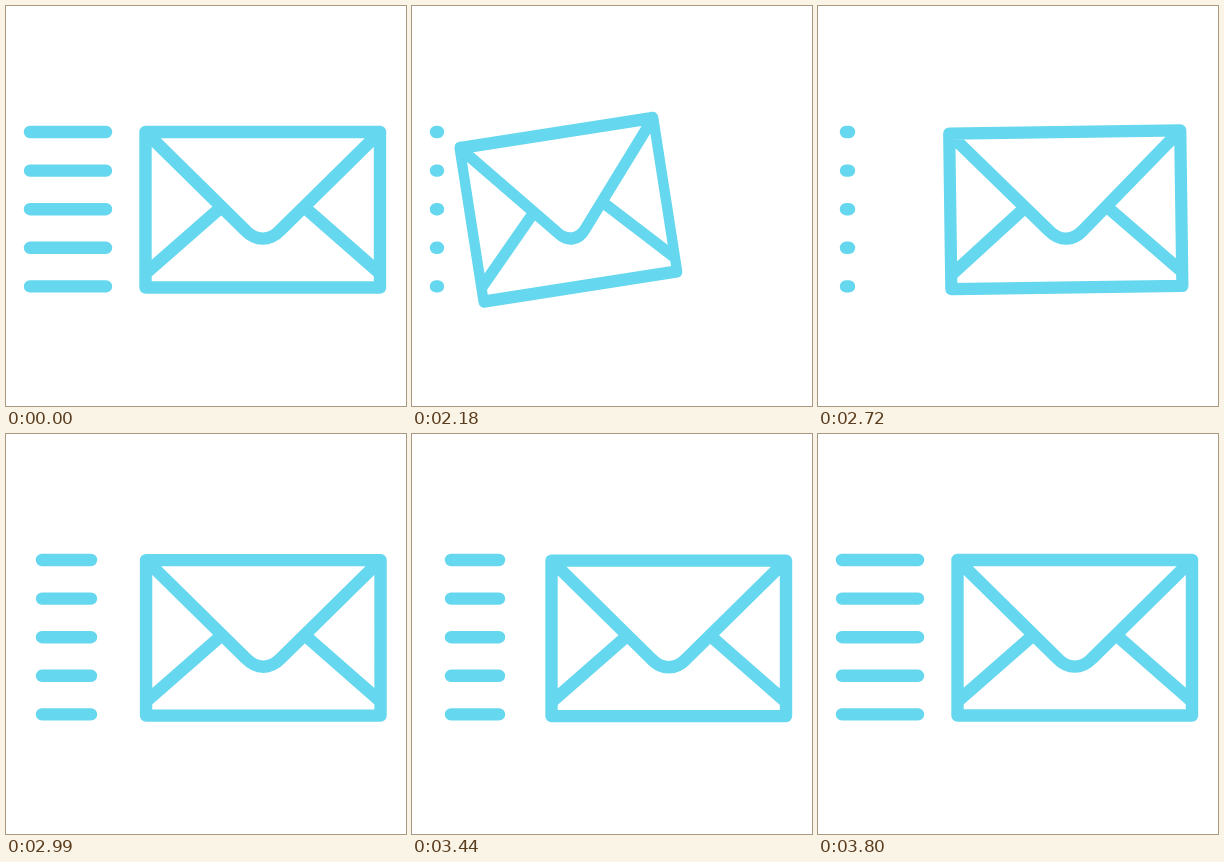
Recreate the animation shown at these times as an HTML page with a canvas. Size 400 by 400 pixels, loop 3830 ms.

```html
<!DOCTYPE html>
<html lang="en">
<head>
<meta charset="utf-8">
<title>Sending mail</title>
<style>
  html, body { margin: 0; width: 100%; height: 100%; overflow: hidden; background: #fff; }
  canvas { display: block; width: 400px; height: 400px; }
</style>
</head>
<body>
<canvas id="stage" width="400" height="400"></canvas>
<script>
const ctx = document.getElementById('stage').getContext('2d');
const LOOP = 3830, HOLD = 2000, STEP = 30;
const BACK = 20;      // step at which the envelope springs forward
const END = 60;
const DECAY = 0.543;  // share of the way left after each step
const CX = 256.75, CY = 203.75;

// step, left end and right end of the speed lines
const LINE_KEYS = [
  [22, 14, 14], [24, 28, 31], [33, 36, 85], [41, 14, 110],
  [48, 39, 87], [56, 14, 110], [60, 24, 100]
];

const lerp = (a, b, k) => a + (b - a) * k;
const easeOut = k => 1 - (1 - k) * (1 - k);
const easeInOut = k => (1 - Math.cos(Math.PI * k)) / 2;

function pull(n) {
  return n < BACK ? 1 - DECAY ** n : DECAY ** (n - BACK);
}

function lineSpan(n) {
  if (n < BACK) {
    const len = 76 * (1 - pull(n));
    return len > 0.5 ? [24, 24 + len] : null;
  }
  const i = LINE_KEYS.findIndex(key => key[0] >= n);
  if (i < 1) return n < LINE_KEYS[0][0] ? null : [24, 100];
  const from = LINE_KEYS[i - 1], to = LINE_KEYS[i];
  const k = (n - from[0]) / (to[0] - from[0]);
  const e = i < 3 ? easeOut(k) : easeInOut(k);
  return [lerp(from[1], to[1], e), lerp(from[2], to[2], e)];
}

function drawLines(n) {
  const span = lineSpan(n);
  if (!span) return;
  ctx.beginPath();
  for (let i = 0; i < 5; i++) {
    const y = 126 + i * 38.6;
    ctx.moveTo(span[0], y);
    ctx.lineTo(span[1], y);
  }
  ctx.stroke();
}

function drawEnvelope(n) {
  const p = pull(n), left = END - n;
  const shake = n > 24 ? 0.6 : 0;
  const dx = shake * Math.sin(Math.PI * left / 6);
  const dy = shake * Math.sin(Math.PI * left / 24) ** 2;

  ctx.save();
  ctx.translate(CX - 103 * p + dx, CY + dy);
  ctx.rotate(-9.1 * p * Math.PI / 180);
  ctx.scale(1 - 0.169 * p, 1);

  ctx.beginPath();
  ctx.rect(-117.25, -77.75, 234.5, 155.5);
  ctx.moveTo(-117.25, -77.75);
  ctx.lineTo(-17, 21);
  ctx.bezierCurveTo(-7, 31.5, 7, 31.5, 17, 21);
  ctx.lineTo(117.25, -77.75);
  for (const side of [-1, 1]) {
    ctx.moveTo(side * 117, 63.5);
    ctx.lineTo(side * 44.5, 0);
  }
  ctx.stroke();
  ctx.restore();
}

function draw(time) {
  const t = time % LOOP;
  const n = Math.max(0, Math.min(END, Math.floor((t - HOLD) / STEP)));
  ctx.fillStyle = '#fff';
  ctx.fillRect(0, 0, 400, 400);
  ctx.strokeStyle = '#65d7ee';
  ctx.lineWidth = 12.4;
  ctx.lineCap = ctx.lineJoin = 'round';
  drawLines(n);
  drawEnvelope(n);
}

let start = null;
function tick(now) {
  if (start === null) start = now;
  draw(now - start);
  requestAnimationFrame(tick);
}
draw(0);
requestAnimationFrame(tick);
</script>
</body>
</html>
```
